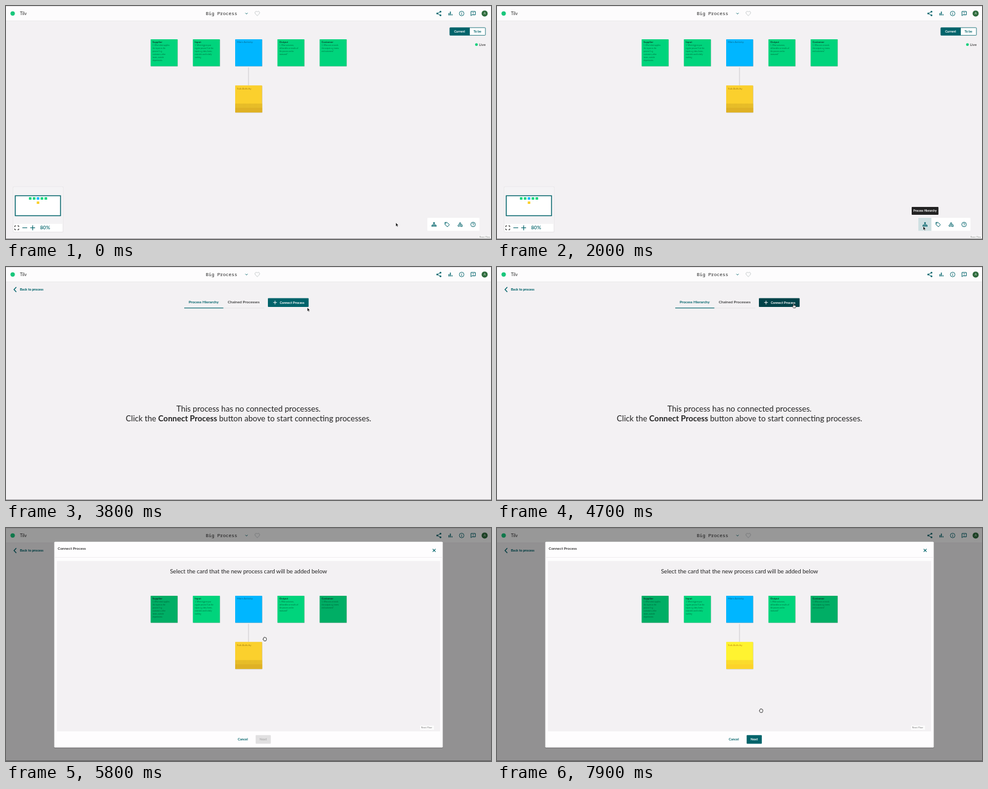
An HTML page that plays this animation: 800 px wide and 385 px high, repeating every 8 s.

```html
<!DOCTYPE html>
<html lang="en">
<head>
<meta charset="utf-8">
<title>Process board</title>
<style>
  html, body { margin: 0; width: 100%; height: 100%; overflow: hidden; background: #f3f1f3; }
  svg { display: block; width: 100vw; height: 100vh; font-family: Lato, sans-serif; }
  .mono { font-family: "Noto Sans Mono", monospace; }
</style>
</head>
<body>
<svg id="stage" viewBox="0 0 800 385"></svg>
<script>
const LOOP = 8000, STEP = 100;
const TEAL = "#00636a", INK = "#222", GREEN = "#00d47c", DEEP = "#00ae65", BLUE = "#00b6ff";

const rect = (x, y, w, h, fill, extra = "") =>
  `<rect x="${x}" y="${y}" width="${w}" height="${h}" fill="${fill}" ${extra}/>`;
const text = (x, y, size, str, fill = INK, extra = "") =>
  `<text x="${x}" y="${y}" font-size="${size}" fill="${fill}" ${extra}>${str}</text>`;
const line = (d, color = TEAL, width = 1, extra = "") =>
  `<path d="${d}" fill="none" stroke="${color}" stroke-width="${width}" ${extra}/>`;
const shape = (d, fill = TEAL) => `<path d="${d}" fill="${fill}"/>`;
const dot = (x, y, r, fill = TEAL, extra = "") =>
  `<circle cx="${x}" cy="${y}" r="${r}" fill="${fill}" ${extra}/>`;
const group = (body, extra = "") => `<g ${extra}>${body}</g>`;
const at = (x, y, body) => group(body, `transform="translate(${x} ${y})"`);
const BOLD = 'font-weight="700"', MIDDLE = 'text-anchor="middle"';

const icons = {
  share: line("M2.6-3 -2.6 0 2.6 3", TEAL, .9) + dot(2.7, -3, 1.4) + dot(-2.7, 0, 1.4) + dot(2.7, 3, 1.4),
  bars: line("M-2.4 3.2V-.6M0 3.2V-3.2M2.6 3.2V1", TEAL, 1.4),
  info: dot(0, 0, 3.8, "none", `stroke="${TEAL}" stroke-width=".9"`) + line("M0-2.1V-1.1M0-.4V2.1", TEAL, .9),
  chat: line("M-3.6-3.4H3.6V2.2H-2L-3.6 3.8Z") + line("M0-2.2V-.2M0 .4V1.3", TEAL, .9),
  tree: rect(-1.2, -3.6, 2.4, 2.4, TEAL) + line("M0-1.5V2M-2.9 2V.3H2.9V2", TEAL, .8) +
    [-4, -1.1, 1.8].map(x => rect(x, 1.3, 2.2, 2.2, TEAL)).join(""),
  tag: line("M-3.6-3.4H-.1L3.8.5.4 3.9-3.6-.1Z") + dot(-2, -1.8, .7),
  shapes: line("M0-3.5 1.8-.6H-1.8Z", TEAL, .9) + dot(-2.1, 2, 1.4, "none", `stroke="${TEAL}" stroke-width=".9"`) +
    rect(.9, .8, 2.5, 2.5, "none", `stroke="${TEAL}" stroke-width=".9"`),
  help: dot(0, 0, 3.8, "none", `stroke="${TEAL}" stroke-width=".9"`) +
    line("M-1.2-.9C-1.2-2.5 1.3-2.5 1.3-.9 1.3 0 0 0 0 1.1M0 1.7V2.5", TEAL, .8)
};

const header =
  rect(0, 0, 800, 24.5, "#fdfcfd") + rect(0, 0, 800, .8, "#dcdadc") + rect(0, 24.3, 800, .8, "#e9e7e9") +
  dot(11, 12.3, 3.6, "#19c77c") + text(23, 14.6, 7, "Tilv") +
  text(329.6, 14.9, 7.85, "Big Process", INK, 'class="mono"') +
  line("M394.9 11.5 396.7 13.3 398.5 11.5", TEAL, .9) +
  line("M414.5 16C412 13.8 410.7 12.6 410.7 11 410.7 8.7 413.4 8.1 414.5 9.9 415.6 8.1 418.3 8.7 418.3 11 418.3 12.6 417 13.8 414.5 16Z", "#b9bfc0", .8) +
  at(714, 12.4, icons.share) + at(733, 12.4, icons.bars) + at(751.6, 12.4, icons.info) + at(770.6, 12.4, icons.chat) +
  dot(789.5, 12.4, 5, "#2d6a3c") + text(789.5, 14.4, 5.4, "A", "#e8f0e8", MIDDLE);

const notes = [
  ["Supplier", ["1. Who/what supplies", "the inputs to the", "process? e.g.", "customers, other", "teams, outside", "departments"]],
  ["Input", ["1. What triggers your", "regular process? List the", "inputs e.g. data, forms,", "materials used in daily", "working"]],
  ["Main Activity", []],
  ["Output", ["1. What outcomes,", "deliverables or results of", "the process can be", "measured?"]],
  ["Customer", ["1. Who uses or needs", "the outputs e.g. teams", "and customers?"]]
];

function card(x, y, fill, title, lines = [], dim = false) {
  return rect(x + .3, y + .5, 44.6, 44.6, "#000", 'opacity=".22" rx=".6"') +
    rect(x, y, 44.4, 44.4, fill, 'rx=".5"') +
    text(x + 3, y + 6.2, 4.5, title, "#111", dim ? 'opacity=".45"' : 'font-weight="600" opacity=".85"') +
    lines.map((s, i) => text(x + 3.2, y + 11 + i * 5, 2.9, s, "#04351f", 'opacity=".62"')).join("");
}

function subCard(y, id) {
  const ticks = [0, 1.8, 3.6, 5.4].map(d => `M378 ${y + 30.6 + d}H422.4`).join("");
  return rect(376.8, y - .8, 46.8, 47, "#000", `id="${id}Shadow" opacity="0" rx="1.5"`) +
    rect(378.2, y + .5, 44.6, 44.6, "#000", 'opacity=".2" rx=".6"') +
    rect(378, y, 44.4, 44.4, "#fbd02d", `id="${id}" rx=".5"`) +
    rect(378, y + 30, 44.4, 14.4, "#e9bf29", `id="${id}Strip"`) +
    rect(378, y + 37, 44.4, 7.4, "#dfb125", `id="${id}Foot"`) +
    line(ticks, "#c99b20", .4, 'stroke-dasharray="1 1" opacity=".6"') +
    text(381, y + 6.2, 4.5, "Sub Activity", "#6a4600", `id="${id}Label" opacity=".6"`);
}

function flow(y, ends, id) {
  return line(`M400 ${y + 46.5}V${y + 76}`, "#c9c7ca", .9) +
    notes.map(([title, lines], i) => card(238.6 + i * 69.7, y, i === 2 ? BLUE : i % 4 ? GREEN : ends, title, lines, i === 2)).join("") +
    subCard(y + 76.3, id);
}

const minimap =
  rect(12, 299, 82, 74.5, "#fff", 'stroke="#dedce0" stroke-width=".7"') +
  rect(13, 300, 80, 60, "#f4f3f5") +
  rect(15.3, 313.5, 74.6, 33, "#fff", `stroke="${TEAL}" stroke-width="1.4"`) +
  [0, 1, 2, 3, 4].map(i => rect(37.8 + i * 6.45, 316, 4.2, 4, i === 2 ? BLUE : GREEN)).join("") +
  rect(50.7, 323, 4.2, 4, "#fbd02d") +
  line("M14.5 365.2V363.2H16.5M19 363.2H21V365.2M21 367.8V369.8H19M16.5 369.8H14.5V367.8", INK, 1) +
  line("M27 366.5H35M40 366.5H48M44 362.5V370.5", TEAL, 1.2) +
  text(56.3, 369.3, 8.3, "80%", TEAL, 'font-weight="600"');

const board =
  flow(55, GREEN, "boardSub") + minimap +
  rect(732, 35.8, 58.8, 12.6, "#fff", `rx="1" stroke="${TEAL}" stroke-width=".8"`) +
  rect(732, 35.8, 33, 12.6, TEAL) +
  text(748.2, 44, 5.3, "Current", "#fff", `${MIDDLE} ${BOLD}`) + text(777.6, 44, 5.3, "To be", TEAL, `${MIDDLE} ${BOLD}`) +
  dot(776, 63.7, 2.3, "#10cf7c") + text(780.2, 65.8, 6.2, "Live") +
  rect(695, 350, 86, 21.5, "#fff", 'rx="1"') +
  rect(695, 350, 21.5, 21.5, "#cfe0e2", 'id="toolHover"') +
  at(706, 361, icons.tree) + at(727.6, 361, icons.tag) + at(749, 361, icons.shapes) + at(770.4, 361, icons.help) +
  group(rect(684, 332, 44.2, 13, "#222", 'rx="1"') +
    text(706, 340.2, 4.8, "Process Hierarchy", "#fff", `${MIDDLE} ${BOLD}`), 'id="tip"') +
  rect(780, 379.5, 20, 5, "#fafafa") + text(781, 383.2, 3.6, "React Flow", "#888");

const hierarchy =
  line("M17 33.3 13.2 37.3 17 41.3", TEAL, 1.3) + text(23, 39.2, 5.5, "Back to process", TEAL, 'font-weight="800"') +
  text(326, 60.3, 6.2, "Process Hierarchy", TEAL, `${MIDDLE} ${BOLD}`) +
  text(392, 60.3, 6.4, "Chained Processes", INK, `${MIDDLE} font-weight="500"`) +
  rect(358, 67.6, 68, .6, "#dddadd") + rect(294, 67.2, 64.5, 1.1, TEAL) +
  rect(432, 51.6, 67.2, 14.3, TEAL, 'id="connect" rx="1"') +
  line("M440.8 58.7H446.8M443.8 55.7V61.7", "#fff", .9) +
  text(451.4, 60.7, 5.5, "Connect Process", "#fff", BOLD) +
  text(400, 238.6, 13.1, "This process has no connected processes.", INK, MIDDLE) +
  text(400, 254.6, 13.1, `Click the <tspan ${BOLD}>Connect Process</tspan> button above to start connecting processes.`, INK, MIDDLE);

const modal =
  rect(79, 23, 642, 341, "#000", 'opacity=".18" rx="2"') +
  rect(79.5, 22.8, 641, 340, "#fefdfe", 'rx="1.5"') +
  text(85.3, 36.3, 6.3, "Connect Process", INK, 'font-weight="600"') +
  rect(79.5, 48.3, 641, .6, "#e7e5e7") +
  line("M703.8 34.6 708.6 39.4M708.6 34.6 703.8 39.4", TEAL, 1.1) +
  rect(84, 54.5, 632, 281.5, "#f3f1f3") +
  text(400, 74.6, 9.6, "Select the card that the new process card will be added below", INK, MIDDLE) +
  flow(112, DEEP, "pick") +
  rect(683, 326.5, 23, 7, "#fcfcfc") + text(684.8, 331.4, 3.7, "React Flow", "#777") +
  text(390.6, 351.3, 5.6, "Cancel", TEAL, `${MIDDLE} ${BOLD}`) +
  rect(411.8, 342.2, 25, 14.3, "#e1e0e1", 'id="next" rx="1"') +
  text(424.3, 351.3, 5.6, "Next", "#b1b0b1", `id="nextLabel" ${MIDDLE} ${BOLD}`);

const arrow = `<path d="M0 0V6.3L1.5 5 2.4 7.1 3.5 6.6 2.6 4.6H4.5Z" fill="#111" stroke="#fff" stroke-width=".5"/>`;
const finger = `<path d="M-.8 0C-.8-.9.4-.9.4 0V2.2L3 2.8C3.6 3 3.6 5 2.7 6.6H-.6L-2.4 4C-2.5 3.2-1.4 3.1-.8 3.9Z" fill="#fff" stroke="#111" stroke-width=".7"/>`;
const grab = `<path d="M-2-.8C-2-2.6-.9-2.6-.8-2 -.7-3.1.5-3.1.6-2 .9-2.7 1.8-2.5 1.8-1.5 2.3-1.9 2.8-1.5 2.8-.7V1.2L1.9 3.3H-1.2L-2.9.8C-3.1-.2-2.3-.2-2 .4Z" fill="#fff" stroke="#111" stroke-width=".8"/>`;

const stage = document.getElementById("stage");
stage.innerHTML =
  rect(0, 0, 800, 385, "#f3f1f3") + header +
  group(board, 'id="board"') + group(hierarchy, 'id="hierarchy"') +
  rect(0, 384.2, 800, .8, "#8b898c") +
  group(rect(0, 0, 800, 385, "#000", 'opacity=".4"') + modal, 'id="modal"') +
  group(group(arrow, 'id="arrow"') + group(finger, 'id="finger"') + group(grab, 'id="grab"'), 'id="cursor"');

const el = id => document.getElementById(id);
const show = (id, on) => el(id).setAttribute("display", on ? "inline" : "none");
const set = (id, name, value) => el(id).setAttribute(name, value);
const ramp = (t, a, b) => Math.max(0, Math.min(1, (t - a) / (b - a)));
const mix = (a, b, k) => `rgb(${a.map((v, i) => Math.round(v + (b[i] - v) * k))})`;

// Pointer path: time, x, y
const path = [
  [0, 643, 358], [800, 643, 358], [1500, 703, 364], [2000, 703, 364], [2100, 705, 365], [2900, 705, 365],
  [3800, 497, 67], [4200, 490, 61], [4700, 489.5, 61], [4900, 489, 61], [5200, 489, 61],
  [6100, 405, 226], [6500, 415, 208], [7500, 415, 208], [7900, 435.6, 301.5], [8000, 435.6, 301.5]
];

function pointerAt(t) {
  const i = Math.max(1, path.findIndex(p => p[0] > t));
  const [t0, x0, y0] = path[i - 1], [t1, x1, y1] = path[i];
  const k = ramp(t, t0, t1), e = k * k * (3 - 2 * k);
  return [x0 + (x1 - x0) * e, y0 + (y1 - y0) * e];
}

function draw(t) {
  const page = t < 2100 ? "board" : "hierarchy", open = t >= 4900;
  show("board", page === "board");
  show("hierarchy", page === "hierarchy");
  show("modal", open);

  set("toolHover", "opacity", ramp(t, 1200, 1500));
  set("tip", "opacity", ramp(t, 1300, 1500));
  set("connect", "fill", mix([0, 99, 106], [0, 67, 73], open ? 0 : ramp(t, 3800, 4200)));

  const picked = ramp(t, 6900, 7300);
  set("pickShadow", "opacity", .28 * ramp(t, 6100, 6400) * (1 - picked));
  set("pick", "fill", mix([251, 208, 45], [255, 243, 48], picked));
  set("pickStrip", "fill", mix([233, 191, 41], [255, 224, 45], picked));
  set("pickFoot", "fill", mix([223, 177, 37], [252, 211, 43], picked));
  set("pickLabel", "fill", mix([106, 70, 0], [150, 60, 0], picked));
  const ready = ramp(t, 7000, 7400);
  set("next", "fill", mix([225, 224, 225], [0, 99, 106], ready));
  set("nextLabel", "fill", mix([177, 176, 177], [255, 255, 255], ready));

  const kind = t >= 5300 ? "grab" : t >= 3900 && !open ? "finger" : "arrow";
  for (const name of ["arrow", "finger", "grab"]) show(name, name === kind);
  set("cursor", "transform", `translate(${pointerAt(t).map(v => v.toFixed(2)).join(" ")})`);
}

const start = performance.now();
function tick() {
  const t = (performance.now() - start) % LOOP;
  draw(Math.floor(t / STEP) * STEP);
  requestAnimationFrame(tick);
}
tick();
</script>
</body>
</html>
```
